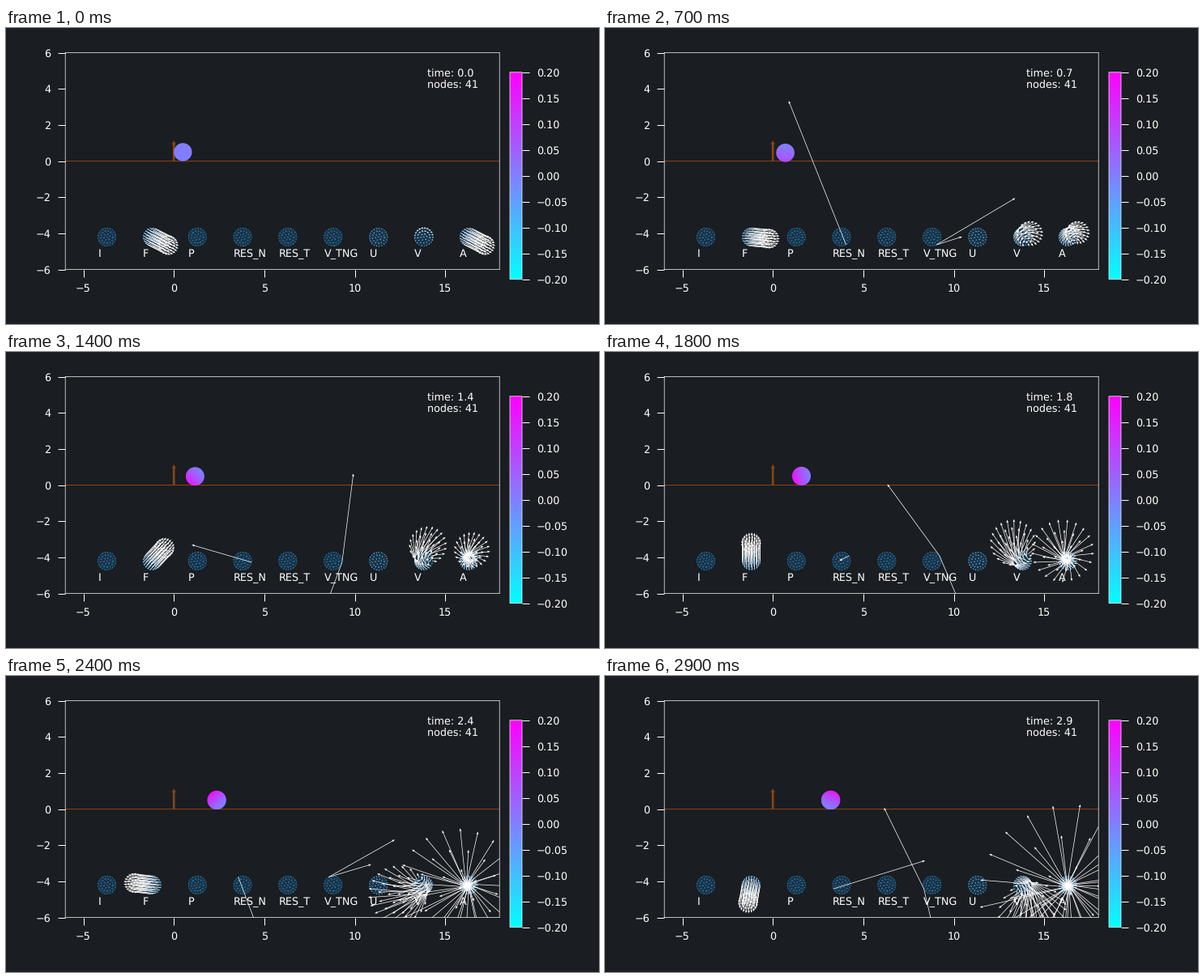
A matplotlib script for the animation above (3000 ms loop, 732x366 px).

```python
import numpy as np
import matplotlib.pyplot as plt
from matplotlib.animation import FuncAnimation
from matplotlib.cm import ScalarMappable
from matplotlib.colors import Normalize
from matplotlib.patches import Circle
from matplotlib.tri import Triangulation

plt.rcParams["text.hinting"] = "none"

W, H, DPI = 732, 366, 91.5
FRAMES, STEP = 30, 100
BG, FG, EARTH, WIRE = "#1a1d21", "white", "saddlebrown", "#1f77b4"
THIN = 0.55
R = 0.5
NAMES = ["I", "F", "P", "RES_N", "RES_T", "V_TNG", "U", "V", "A"]
CENTERS = {n: np.array([-3.7 + 2.5 * k, -4.2]) for k, n in enumerate(NAMES)}

# Key lengths of the contact arrows: normal push and two signed slips.
KEY_TIMES = [0, 0.5, 1, 1.8, 2.2, 2.6, 2.9]
PUSH = [0, 10.1, 6.3, 0.6, 2.8, 3.3, 5.3]
SLIP_A = [0, 5.1, 5, 4.9, -3.4, -5, -5]
SLIP_B = [0, 4.8, -3.5, -2.6, 0, -4.9, 1.8]


def disc_nodes():
    points = [(0, 0)]
    for ring, count in enumerate((6, 13, 21), 1):
        a = 2 * np.pi * np.arange(count) / count + 0.2 * ring
        points += list(zip(R * ring / 3 * np.cos(a), R * ring / 3 * np.sin(a)))
    return np.array(points)


def unit(degrees):
    a = np.radians(degrees)
    return np.array([np.cos(a), np.sin(a)])


def roll(t):
    """Angle in degrees that the disc has rolled."""
    return 30.9 * t**2 + 9.4 * t


NODES = disc_nodes()
SPIN = np.column_stack([NODES[:, 1], -NODES[:, 0]]) / R


def contact_arrows(t):
    """Start points and vectors of the long arrows at the contact node."""
    angle = roll(t)
    node = R * unit(angle - 82)
    push, a, b = (np.interp(t, KEY_TIMES, key) for key in (PUSH, SLIP_A, SLIP_B))
    start = np.array([CENTERS["RES_N"], CENTERS["V_TNG"], CENTERS["V_TNG"]]) + node
    vec = np.array([push * unit(angle + 90), a * unit(angle + 9), b * unit(angle - 4)])
    return start, vec


def fields(t):
    """Vectors of force, velocity and acceleration in the frame of the disc."""
    ahead = unit(roll(t))
    force = np.tile(1.09 * unit(roll(t) - 27), (len(NODES), 1))
    speed = 0.6 * t + 0.06
    velocity = 1.03 * speed * (ahead + SPIN)
    if t == 0:
        return force, velocity, force
    accel = 0.63 * (ahead + SPIN) - 0.66 * t**2 * NODES / R
    return force, velocity, accel


fig = plt.figure(figsize=(W / DPI, H / DPI), dpi=DPI, facecolor=BG)
ax = fig.add_axes([73.2 / W, 1 - 298.6 / H, 536 / W, 268 / H], facecolor=BG)
ax.set(xticks=range(-5, 16, 5), yticks=range(-6, 7, 2))
cax = fig.add_axes([622 / W, 1 - 310.7 / H, 15 / W, 256 / H])
bar = fig.colorbar(ScalarMappable(Normalize(-0.2, 0.2), "cool"), cax=cax,
                   ticks=np.linspace(-0.2, 0.2, 9))
for a in (ax, cax):
    a.tick_params(length=7, width=0.8, pad=7, color=FG, labelcolor=FG, labelsize=10)
for edge in (*ax.spines.values(), bar.outline):
    edge.set(edgecolor=FG, linewidth=THIN, snap=False)

ax.axhline(0, color=EARTH, lw=0.8, zorder=1, snap=False)
ax.quiver([0], [0], [0], [1.15], color=EARTH, angles="xy", scale_units="xy", scale=1,
          units="dots", width=2.6, headwidth=1.9, headlength=1.9,
          headaxislength=1.9, zorder=1.5)

mesh = Triangulation(*NODES.T)
for name, (cx, cy) in CENTERS.items():
    ax.triplot(NODES[:, 0] + cx, NODES[:, 1] + cy, mesh.triangles, color=WIRE,
               lw=0.4, alpha=0.85)
    ax.text(cx - 0.5, -5.3, name, color=FG, fontsize=10)
ax.scatter(*(NODES + CENTERS["U"]).T, s=0.8, color=FG, alpha=0.4, linewidths=0, zorder=3)
info = ax.text(14, 4, "", color=FG, fontsize=10)

gx, gy = np.meshgrid(np.linspace(-1, 1, 32), np.linspace(-1, 1, 32))
ball = ax.imshow(gx, cmap="cool", vmin=0, vmax=1, origin="lower", aspect="auto",
                 interpolation="bilinear", extent=(0, 1, 0, 1), zorder=2)
ax.set(xlim=(-6, 18), ylim=(-6, 6))
white = []


def draw_ball(t):
    x = 0.5 + 0.3 * t**2 + 0.06 * t
    y = 0.5 - 0.04 * np.sin(np.pi * min(t, 1.6) / 1.6)
    r = R + 0.01 * t
    dx, dy = unit(-90 - 24 * t**2)
    s = np.clip((gx * dx + gy * dy + 1) / 2, 0, 1)
    ball.set_data(0.51 + 0.46 * np.sin(np.pi * t / 4.6) * s**1.4)
    ball.set_extent((x - r, x + r, y - r, y + r))
    ball.set_clip_path(Circle((x, y), r, transform=ax.transData))


def update(i):
    t = i / 10
    draw_ball(t)
    starts, vectors = contact_arrows(t)
    pos = np.vstack([NODES + CENTERS[n] for n in "FVA"] + [starts])
    vec = np.vstack([*fields(t), vectors])
    while white:
        white.pop().remove()
    white.append(ax.quiver(*pos.T, *vec.T, color=FG, angles="xy", scale_units="xy",
                           scale=1, units="dots", width=0.7, headwidth=4,
                           zorder=2.5))
    info.set_text(f"time: {t:.1f}\nnodes: {len(NODES)}")
    return [ball, info, *white]


anim = FuncAnimation(fig, update, frames=FRAMES, interval=STEP, repeat=True,
                     repeat_delay=0, blit=False)
plt.show()
```
